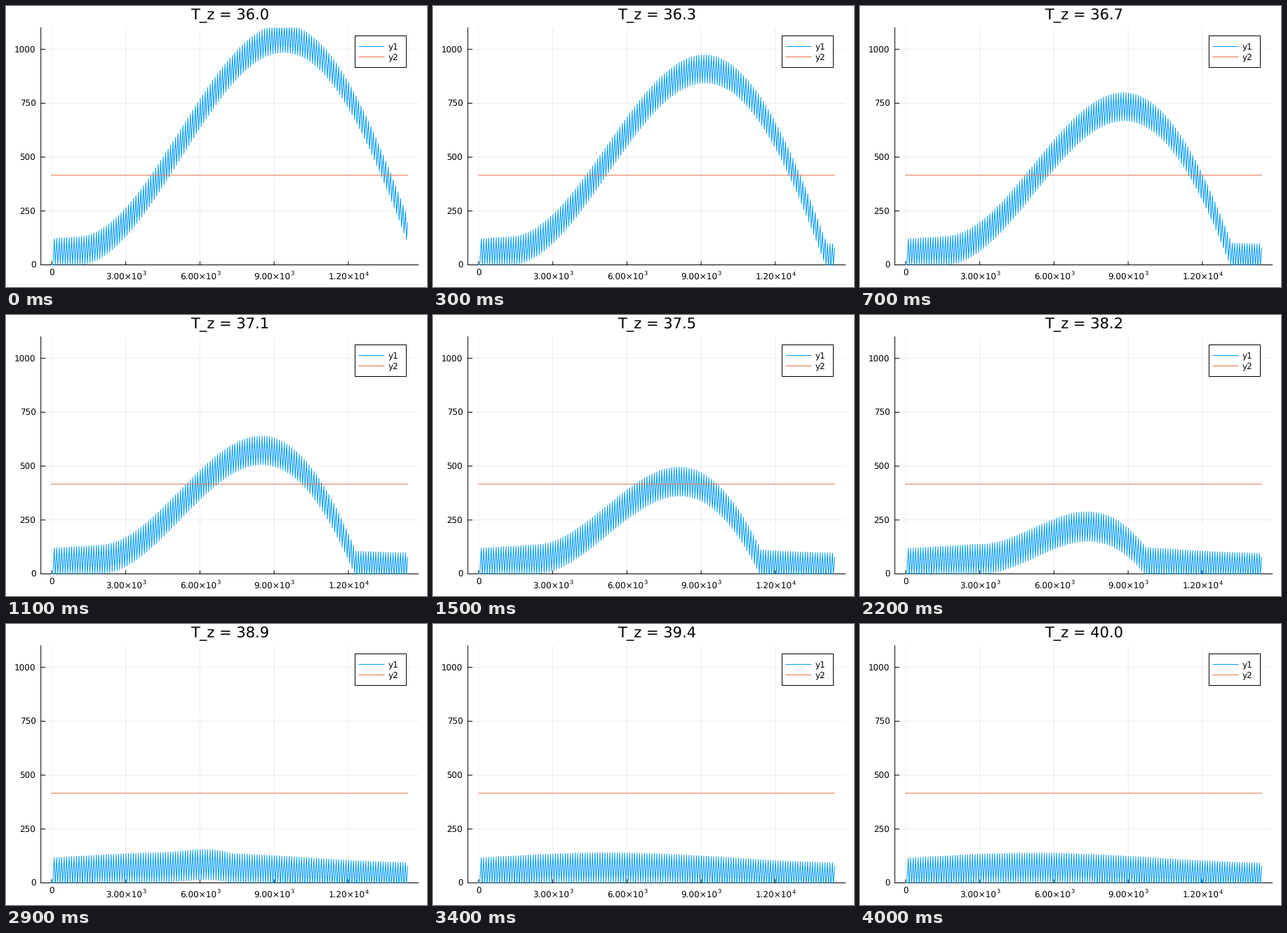
Animation, 600 px wide and 400 px high, one loop 4.1 s. Source, as a matplotlib script:

```python
import numpy as np
import matplotlib.pyplot as plt
from matplotlib.animation import FuncAnimation
from matplotlib.patches import Rectangle

plt.rcParams["font.family"] = "DejaVu Sans"
plt.rcParams["text.hinting"] = "none"

W, H, DPI = 600, 400, 100
LEFT, RIGHT, TOP, BOTTOM = 49.7, 587.7, 31, 368.5
T_END, Y_MAX = 14400, 1100
CYCLE, FIRST_RED = 100, 50
DRAIN = 3.5945
BLUE, ORANGE = "#009af9", "#e26f46"
PT = 72 / DPI


def sx(t):
    pad = 0.03 * T_END
    return LEFT + (np.asarray(t) + pad) / (T_END + 2 * pad) * (RIGHT - LEFT)


def sy(v):
    return BOTTOM - np.asarray(v) / Y_MAX * (BOTTOM - TOP)


def arrival(t):
    """Arrival rate per second, a slow wave over the four hours."""
    return 1.917 + 0.39 * np.cos(2 * np.pi * (t - 5200) / 20200)


def queue(green):
    """Corner points of the queue: it grows on red and drains on green."""
    red = CYCLE - green
    t, q = FIRST_RED, 0.0
    ts, qs = [0, t], [0, 0]
    while t < T_END:
        step = min(red, T_END - t)
        q += arrival(t + step / 2) * step
        t += step
        ts.append(t)
        qs.append(q)
        if t >= T_END:
            break
        empty = q / DRAIN
        if empty < green:
            ts.append(t + empty)
            qs.append(0)
        q = max(0.0, q - DRAIN * green)
        t += green
        ts.append(t)
        qs.append(q)
    return ts, qs


fig = plt.figure(figsize=(W / DPI, H / DPI), dpi=DPI, facecolor="white")
ax = fig.add_axes([0, 0, 1, 1])
ax.set_xlim(0, W)
ax.set_ylim(H, 0)
ax.axis("off")


def line(x, y, color="black", z=2, **kw):
    return ax.plot(x, y, color=color, lw=PT, zorder=z, snap=False, **kw)[0]


def label(x, y, text, size=12, ha="left"):
    return ax.text(x, y, text, fontsize=size * PT, ha=ha, va="baseline", zorder=6)


# grid, ticks and tick labels
for v in range(0, 1001, 250):
    y = float(sy(v))
    if v:
        line([LEFT, RIGHT], [y, y], z=1, alpha=0.07)
    line([LEFT, LEFT + 6], [y, y])
    label(42.5, y + 4.8, str(v), ha="right")

for t in range(0, 12001, 3000):
    x = float(sx(t))
    line([x, x], [TOP, BOTTOM], z=1, alpha=0.07)
    line([x, x], [BOTTOM - 4.5, BOTTOM])
    if t == 0:
        label(x, 383.5, "0", ha="center")
        continue
    power = int(np.log10(t))
    label(x - 28.4, 389.8, f"{t / 10 ** power:.2f}×10")
    label(x + 23.7, 383.5, str(power), size=8.4)

line([LEFT, LEFT], [TOP, BOTTOM])
line([LEFT, RIGHT], [BOTTOM, BOTTOM])

# series
curve = line([], [], BLUE, z=3)
curve.set_clip_path(Rectangle((LEFT, TOP), RIGHT - LEFT, BOTTOM - TOP + 0.5,
                              transform=ax.transData))
line(sx([0, T_END]), sy([416, 416]), ORANGE, z=4)

# legend
ax.add_patch(Rectangle((497.5, 42.5), 73, 45, fc="white", ec="black",
                       lw=PT, zorder=5, snap=False))
for y, name, color in ((57.5, "y1", BLUE), (72.5, "y2", ORANGE)):
    line([503, 539], [y, y], color, z=6)
    label(544.5, y + 4.8, name)

title = label(319.5, 18.8, "", size=21, ha="center")


def update(i):
    green = 36 + i / 10
    ts, qs = queue(green)
    curve.set_data(sx(ts), sy(qs))
    title.set_text(f"T_z = {green:.1f}")
    return curve, title


anim = FuncAnimation(fig, update, frames=41, interval=100, repeat=True,
                     repeat_delay=0)
plt.show()
```
